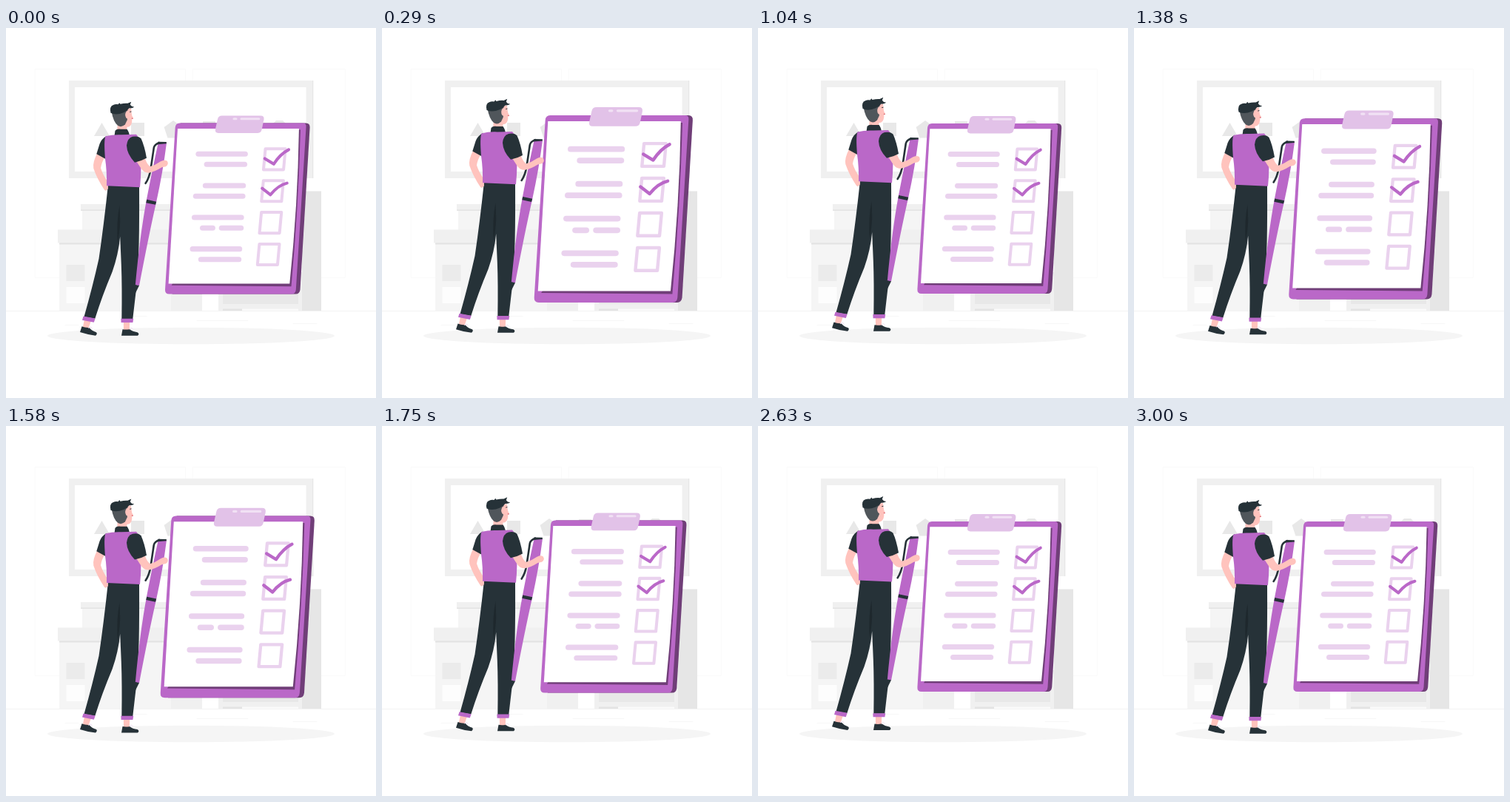
An HTML page with a canvas for the animation above (3.04 s loop, 500 px wide and 500 px high).

```html
<!DOCTYPE html>
<html lang="en">
<head>
<meta charset="utf-8">
<title>Checklist</title>
<style>
html, body { margin: 0; width: 100%; height: 100%; overflow: hidden; background: #fff; }
canvas { display: block; width: 100vw; height: 100vh; }
</style>
</head>
<body>
<canvas id="stage"></canvas>
<script>
const canvas = document.getElementById('stage');
const ctx = canvas.getContext('2d');

const LOOP = 3040;
const STEP = 1000 / 24;
const PURPLE = '#ba68c8', DEEP = '#703e78', CLIP = '#e2c2e8', LILAC = '#ead2ee', PALE = '#f1e1f4';
const DARK = '#263238', FOLD = '#1e282d', SHAVED = '#50565b', SKIN = '#ffc3bd';

function fill(d, color) {
  ctx.fillStyle = color;
  ctx.fill(new Path2D(d));
}

function line(d, color, width = 1) {
  ctx.strokeStyle = color;
  ctx.lineWidth = width;
  ctx.lineCap = ctx.lineJoin = 'round';
  ctx.stroke(new Path2D(d));
}

// box given by its edges
function box(x1, y1, x2, y2, color) {
  ctx.fillStyle = color;
  ctx.fillRect(x1, y1, x2 - x1, y2 - y1);
}

function bar(x1, x2, y, h, color) {
  line(`M${x1 + h / 2} ${y + h / 2}H${x2 - h / 2}`, color, h);
}

function polygon(cx, cy, r, n, turn, color) {
  ctx.beginPath();
  for (let i = 0; i < n; i++) {
    const a = turn + i * 2 * Math.PI / n;
    ctx.lineTo(cx + r * Math.cos(a), cy + r * Math.sin(a));
  }
  ctx.fillStyle = color;
  ctx.fill();
}

function drawRoom() {
  line('M39.5 55.5H242.5V337.5H39.5ZM252.5 55.5H458.5V337.5H252.5Z', '#fafafa');

  // wall board
  box(85, 71, 415, 203, '#f0f0f0');
  box(414, 71, 415.3, 203, '#e6e6e6');
  box(93, 80, 405.5, 194, '#fff');
  fill('M129.5 128L140 146H119Z', '#e8e8e8');
  box(169, 128, 187, 146, '#e8e8e8');
  polygon(226, 138, 13, 5, -Math.PI / 2, '#e8e8e8');
  box(266, 126, 283, 146, '#e8e8e8');
  polygon(369.5, 136, 12, 8, Math.PI / 8, '#e8e8e8');

  // left drawers
  box(103, 246, 222, 273, '#f5f5f5');
  box(101, 238, 224, 246, '#f0f0f0');
  box(101, 245.5, 224, 247, '#e3e3e3');
  box(72, 291, 223, 382, '#f5f5f5');
  box(223, 291, 265, 382, '#f0f0f0');
  box(70, 272.5, 266, 290.5, '#f0f0f0');
  box(72, 290.3, 265, 292.5, '#e3e3e3');
  box(81.5, 320, 106.5, 342, '#ebebeb');
  box(81.5, 350, 106.5, 372, '#fdfdfd');

  // right cabinet
  box(287, 330, 400, 382, '#f0f0f0');
  box(293, 330, 395, 373, '#e8e8e8');
  box(293, 379.5, 319, 382, '#e3e3e3');
  box(319, 379.5, 395, 382, '#fafafa');
  box(400, 220.5, 426, 382, '#e6e6e6');

  // floor
  box(0, 382, 500, 383, '#f3f3f3');
  line('M160 389.5H190M258 395.5H327M80 401.5H98M388 399.5H420', '#f7f7f7');
  ctx.fillStyle = '#f5f5f5';
  ctx.beginPath();
  ctx.ellipse(250, 416, 194, 11.3, 0, 0, 2 * Math.PI);
  ctx.fill();
}

function checkbox(x, y) {
  line(`M${x + 4.6} ${y + 2}h27l-2.6 28h-27Z`, LILAC, 4);
}

function drawBoard() {
  fill('M236 129H405Q410.5 129 410.2 135L397.2 353Q396.5 359 391 359H225Z', DEEP);
  fill('M235 129H401Q405.5 129 405.2 134L391.5 353Q391 359 385.5 359H221Q215 359 215.4 353L229 135Q229.5 129 235 129Z', PURPLE);
  fill('M394 138H397.6Q395 240 385.2 348.7L224 347.2L226 344Z', DEEP);
  fill('M232.3 136.3H395.6Q394 240 383 345H220Z', '#fff');

  fill('M292 119H344Q349 119 348.4 124L345.6 137.5Q344.6 142.4 340 142.4H287Q282.4 142.4 283 137.5L286 124Q287 119 292 119Z', CLIP);
  bar(306.5, 312.5, 121.8, 3, PALE);
  bar(316.5, 343.2, 121.8, 3, PALE);

  const rows = [
    [256.6, 326.8, 167], [267.8, 326, 181],
    [266, 324.2, 209.7], [253, 323.5, 223.8],
    [251.2, 321.6, 252.4], [262.2, 283, 266.7], [287.8, 321.2, 266.7],
    [248.8, 319.2, 294.9], [260, 318.2, 309]
  ];
  for (const [x1, x2, y] of rows) bar(x1, x2, y, 7, LILAC);

  for (let i = 0; i < 4; i++) checkbox(345.8 - i * 2.7, 161.6 + i * 42.7);
  line('M349.6 176.7L361.6 184Q370.5 170.5 381.8 164.7', PURPLE, 4);
  line('M346 216.8L357.2 225.4Q367.5 212.5 379.5 209.7', PURPLE, 4);
}

function drawLegs() {
  // ankles and shoes
  fill('M106 394L115 396L111.5 406H103.5Z', SKIN);
  fill('M158.8 396H167.2L166.8 409H159Z', SKIN);
  fill('M102.5 403.5Q107 405.5 112.5 405.2Q116 409.5 122 411.3Q124 413 121 415.8Q111 414.8 100 411.2Z', DARK);
  fill('M157.5 407.3Q162 408.3 167 407.2Q171 410.5 177.5 411.3Q181 413.5 178 415.8H156Z', DARK);
  line('M111.5 405.4L115 404.2L116 406.2', PALE, 1);
  line('M167 407.2L169.5 405.2L171.5 407.2', PALE, 1);

  // trousers
  fill('M138 212L180 214Q180.5 300 177.5 340Q174 370 171.3 393.5H156.3Q157 350 155.8 320L154.2 282Q152 306 143.5 330Q130 362 120.3 393L105.5 390.5Q117 350 125.5 312Q132 268 138 212Z', DARK);
  fill('M153.5 240Q149 262 150.8 292Q153.8 275 154.2 262Z', FOLD);
  fill('M104.5 389.7L120.6 392.7L118.8 398L103 394.8Z', PURPLE);
  fill('M155.3 393H172.2L171.4 398.2H155.6Z', PURPLE);
}

function drawPen() {
  fill('M205.5 156.5L217 155.5Q212 195 203.2 235Q193 280 180 348.5L174.8 347.5Q181 280 190 232Q198 190 205.5 156.5Z', PURPLE);
  fill('M190.2 232L203.2 234.8L202 239L189.3 236.3Z', DARK);
  fill('M175 347.3L180 348.2L174.4 359.5Q173.2 360.5 173.3 358.5Z', DARK);
  fill('M205.5 154L216.8 154.2V156.5L205 157.5Z', DARK);
  line('M207 155.2Q200.8 157.5 199.8 162L195.5 191Q193.5 203 188.6 210', DARK, 2.6);
}

function drawBody() {
  // rear arm
  fill('M124 168Q116.500 182 118.3 190Q123 204 133 219Q136 221.500 138 217L137 207Q131 199 128 189.500Q129 182 134 174Z', SKIN);
  fill('M136 146Q129 150 126.500 157L122.300 170.500L135 177.500Z', DARK);

  // neck, collar and vest
  fill('M151 126L164 128L163 141H150Z', SKIN);
  fill('M147.500 139Q150 136 155 137H163.500Q166 140 167 146H146.500Z', DARK);
  fill('M134.500 146.500Q144 144 156 144.500L176 144Q181 148 181.500 165Q183.500 192 181 215.300L136 213.300Q136.500 194 134 177Q132 152 134.500 146.500Z', PURPLE);
}

function drawHead() {
  fill('M162 109L169 109Q169.500 115 170.200 118.500L172 122L170.300 123.500Q170.600 131 166.500 133.500Q162 135 158 132Z', SKIN);
  fill('M142.500 113Q145 127 151 132Q156 135.500 161 130.500L163.800 124.500L164.500 109Z', SHAVED);
  fill('M163 112.500L165 112L165.500 123.500L162.500 122Q159.500 117.500 163 112.500Z', SKIN);
  line('M167.600 113.500L169 113.200', DARK, 1);
  line('M170.300 122.300L171.200 122.400', '#d9636f', 1.2);
  fill('M141.500 115Q139.500 106 145 104.200Q148 102.700 151.500 103.500L153.200 101.300L154.500 103Q160 101.600 164.500 102L169.200 99.800L167.800 103.800L170 106L173.300 106.800Q170.500 109 166.500 108.500Q164 112 159 114.300Q149 118.500 141.500 115Z', DARK);
}

function drawArm() {
  fill('M174 177L187 174Q190 184 194.500 187.500Q202 185.500 209 180.500Q214 177.500 217.800 180Q220.500 184.500 216 187.300L210.500 188.500Q201 194.500 193.500 195.800Q187 196.500 182.500 190Z', SKIN);
  fill('M171 147Q179 145.500 182.500 149.500Q187 159 190 176Q183 180 174 181.800Q163.500 171 163 159Q164 149 171 147Z', DARK);
}

// linear interpolation through [time, value] stops
function track(t, stops) {
  for (let i = 1; i < stops.length; i++) {
    const [t0, v0] = stops[i - 1], [t1, v1] = stops[i];
    if (t <= t1) return v0 + (v1 - v0) * (t - t0) / (t1 - t0);
  }
  return stops[stops.length - 1][1];
}

const BEAT = [[0, 1], [300, 1.1], [900, 1], [1200, 1], [1500, 1.1], [1800, 1], [3000, 1]];
const FLOAT = [[0, 0], [750, -10], [1500, 0]];

function draw(now) {
  const tick = Math.floor((now % LOOP + 5) / STEP);
  const t = Math.min(tick * STEP + 12, 3000);

  const ratio = window.devicePixelRatio || 1;
  const w = Math.round(innerWidth * ratio), h = Math.round(innerHeight * ratio);
  if (canvas.width !== w || canvas.height !== h) {
    canvas.width = w;
    canvas.height = h;
  }
  ctx.setTransform(w / 500, 0, 0, h / 500, 0, 0);
  box(0, 0, 500, 500, '#fff');
  drawRoom();

  const s = track(t, BEAT);
  ctx.save();
  ctx.translate(313, 239);
  ctx.scale(s, s);
  ctx.translate(-313, -239);
  drawBoard();
  ctx.restore();

  ctx.save();
  ctx.translate(0, track(t % 1500, FLOAT));
  drawLegs();
  drawBody();
  drawHead();
  drawPen();
  drawArm();
  ctx.restore();
}

let start;
function loop(now) {
  start ??= now;
  draw(now - start);
  requestAnimationFrame(loop);
}
draw(0);
requestAnimationFrame(loop);
</script>
</body>
</html>
```
